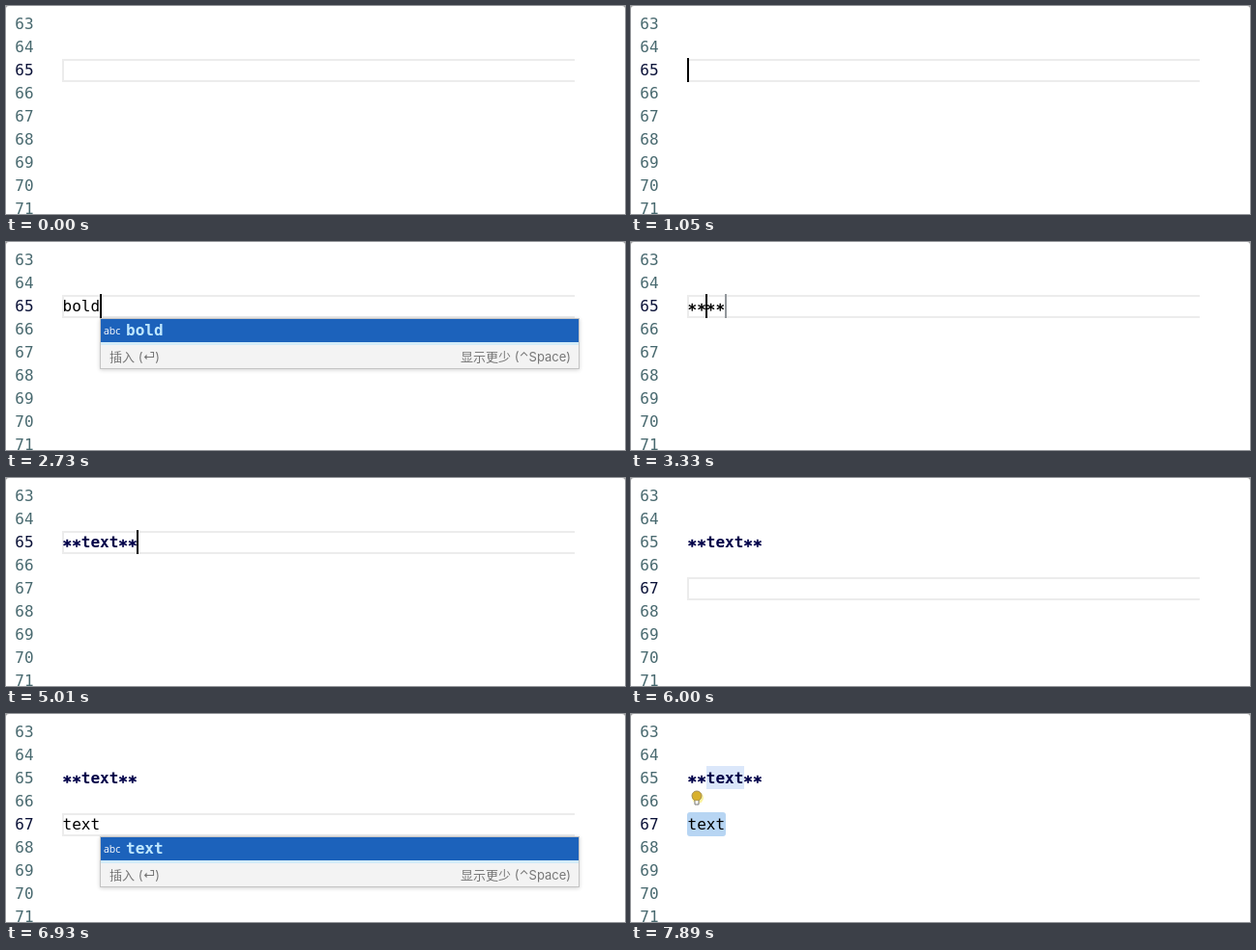
Recreate the animation shown at these times as an HTML page. Size 640x216 px, loop 8000 ms.

```html
<!DOCTYPE html>
<html lang="zh">
<head>
<meta charset="utf-8">
<title>Editor snippet</title>
<style>
  html, body { margin: 0; width: 100%; height: 100%; overflow: hidden; background: #999; }
  #stage {
    position: relative; width: 640px; height: 216px; overflow: hidden;
    background: #fff; border-radius: 3px 3px 0 0;
    font: 16px/24px "DejaVu Sans Mono", monospace; color: #000; white-space: pre;
  }
  #stage div { position: absolute; box-sizing: border-box; }
  .num { left: 9.3px; color: #48696f; }
  .num.on { color: #0b1238; }
  .code { left: 58.5px; }
  .code i { font-style: normal; position: relative; top: 3.5px; -webkit-text-stroke: .5px; }
  .code.bold { font-weight: bold; color: #000048; }
  #band { left: 58px; width: 530px; height: 24px; border: 2px solid #ececec; border-right: 0; }
  #caret { width: 2px; height: 25px; background: #000; }
  #stop { width: 2px; height: 25px; background: #92979b; }
  #twin { left: 77.5px; top: 54px; width: 39.5px; height: 24px; background: #dbe7fa; }
  #pick { left: 58px; top: 102px; width: 40px; height: 25px; background: #b7d5f3; border-radius: 3px; }
  #bulb { position: absolute; left: 61px; top: 79px; }
  #popup {
    width: 496px; background: #f3f3f3; border: 1px solid #c4c4c4;
    box-shadow: 0 1px 4px rgba(0, 0, 0, .18);
  }
  #stage #popup div { position: relative; }
  #popup .row { height: 24px; line-height: 24px; padding-left: 26px; }
  #popup b { color: #1260b0; }
  #popup .row:first-child { background: #1c62bb; color: #fff; }
  #popup .row:first-child b { color: #bfe8ff; }
  #popup .row::before {
    content: "abc"; position: absolute; left: 3px; top: 1px;
    font: 10.5px/22px "Open Sans", sans-serif; color: #555;
  }
  #popup .row:first-child::before { color: #fff; }
  #popup .foot {
    height: 27px; padding: 0 8px 0 9px; border-top: 3px solid #d3ecf8;
    display: flex; justify-content: space-between;
    font: 13px/25px Inter, "Noto Sans CJK SC", "Noto Sans CJK", "DejaVu Sans", sans-serif; color: #777;
  }
</style>
</head>
<body>
<div id="stage">
  <div id="band"></div>
  <div id="twin"></div>
  <div id="pick"></div>
  <div id="upper" class="code" style="top:55px"></div>
  <div id="lower" class="code" style="top:103px"></div>
  <svg id="bulb" width="14" height="18">
    <circle cx="8" cy="8" r="6" fill="#fdf3a0"/>
    <path d="M5 11 Q2 9 2 6 A5 5 0 0 1 12 6 Q12 9 9 11Z" fill="#d8b02c" stroke="#a5905a"/>
    <path d="M5 11 V15 H9 V11" fill="#fff" stroke="#777"/>
  </svg>
  <div id="stop"></div>
  <div id="caret"></div>
  <div id="popup"></div>
</div>
<script>
const LOOP = 8000, BLINK = 490, CHAR = 9.633, LEFT = 58.5, FIRST = 63;
const $ = id => document.getElementById(id);
const stage = $("stage");
const lineTop = n => 6 + (n - FIRST) * 24;
const colX = c => LEFT + c * CHAR;

const nums = Array.from({ length: 9 }, (_, i) => {
  const el = document.createElement("div");
  el.className = "num";
  el.textContent = FIRST + i;
  el.style.top = lineTop(FIRST + i) + 1 + "px";
  return stage.appendChild(el);
});
stage.append($("popup"));

const B = ["belleek", "biggl", "biggr", "binary", "blackboard", "body", "bold"];
const T = ["table", "template", "text", "title"];
const starting = (list, word) => list.filter(w => w.startsWith(word));

// Each step carries over what it does not change; quiet steps leave the blink phase alone.
const steps = [];
function step(at, change, quiet) {
  const last = steps[steps.length - 1] || { upper: "", lower: "", line: 65, col: 0, list: [] };
  steps.push({ ...last, ...change, at, key: quiet ? last.key : at });
}
step(30, {});
step(1830, { upper: "b", col: 1 });
step(1950, { list: B }, true);
[[2290, "bo"], [2450, "bol"], [2610, "bold"]].forEach(([at, word]) =>
  step(at, { upper: word, col: word.length, list: starting(B, word) }));
step(3060, { upper: "****", col: 2, list: [], stop: true });
[3780, 3990, 4180, 4380].forEach((at, i) =>
  step(at, { upper: `**${"text".slice(0, i + 1)}**`, col: i + 3 }));
step(4620, { col: 8, stop: false });
step(5400, { line: 66, col: 0 });
step(5500, { line: 67 });
step(6090, { lower: "t", col: 1 });
step(6210, { list: T }, true);
[[6250, "te"], [6350, "tex"], [6440, "text"]].forEach(([at, word]) =>
  step(at, { lower: word, col: word.length, list: starting(T, word) }));
step(7230, { list: [] });
step(7400, { picked: true });
step(7620, { bulb: true }, true);

function show(id, on) { $(id).style.display = on ? "" : "none"; }
function place(id, x, y) {
  $(id).style.left = x + "px";
  $(id).style.top = y + "px";
}
const stars = text => text.replace(/\*+/g, "<i>$&</i>");

function drawPopup(s) {
  show("popup", s.list.length);
  place("popup", colX(s.col), lineTop(s.line) + 25);
  $("popup").innerHTML = s.list.map(w =>
    `<div class="row"><b>${w.slice(0, s.col)}</b>${w.slice(s.col)}</div>`).join("") +
    '<div class="foot"><span>插入 (⏎)</span><span>显示更少 (⌃Space)</span></div>';
}

function draw(s) {
  const y = lineTop(s.line);
  nums.forEach((el, i) => el.classList.toggle("on", FIRST + i === s.line));
  $("upper").innerHTML = stars(s.upper);
  $("upper").classList.toggle("bold", /[a-z]\*/.test(s.upper));
  $("lower").textContent = s.lower;
  $("band").style.top = y + 1 + "px";
  show("band", !s.picked);
  show("twin", s.picked);
  show("pick", s.picked);
  show("bulb", s.bulb);
  show("stop", s.stop);
  place("stop", colX(s.upper.length) - .5, y);
  place("caret", colX(s.col) - .5, y);
  drawPopup(s);
}

let shown;
function frame(now) {
  const t = now % LOOP;
  const s = steps.findLast(k => k.at <= t) || steps[0];
  if (s !== shown) draw(shown = s);
  show("caret", t >= s.key && (t - s.key) % (2 * BLINK) < BLINK);
  requestAnimationFrame(frame);
}
frame(0);
</script>
</body>
</html>
```
